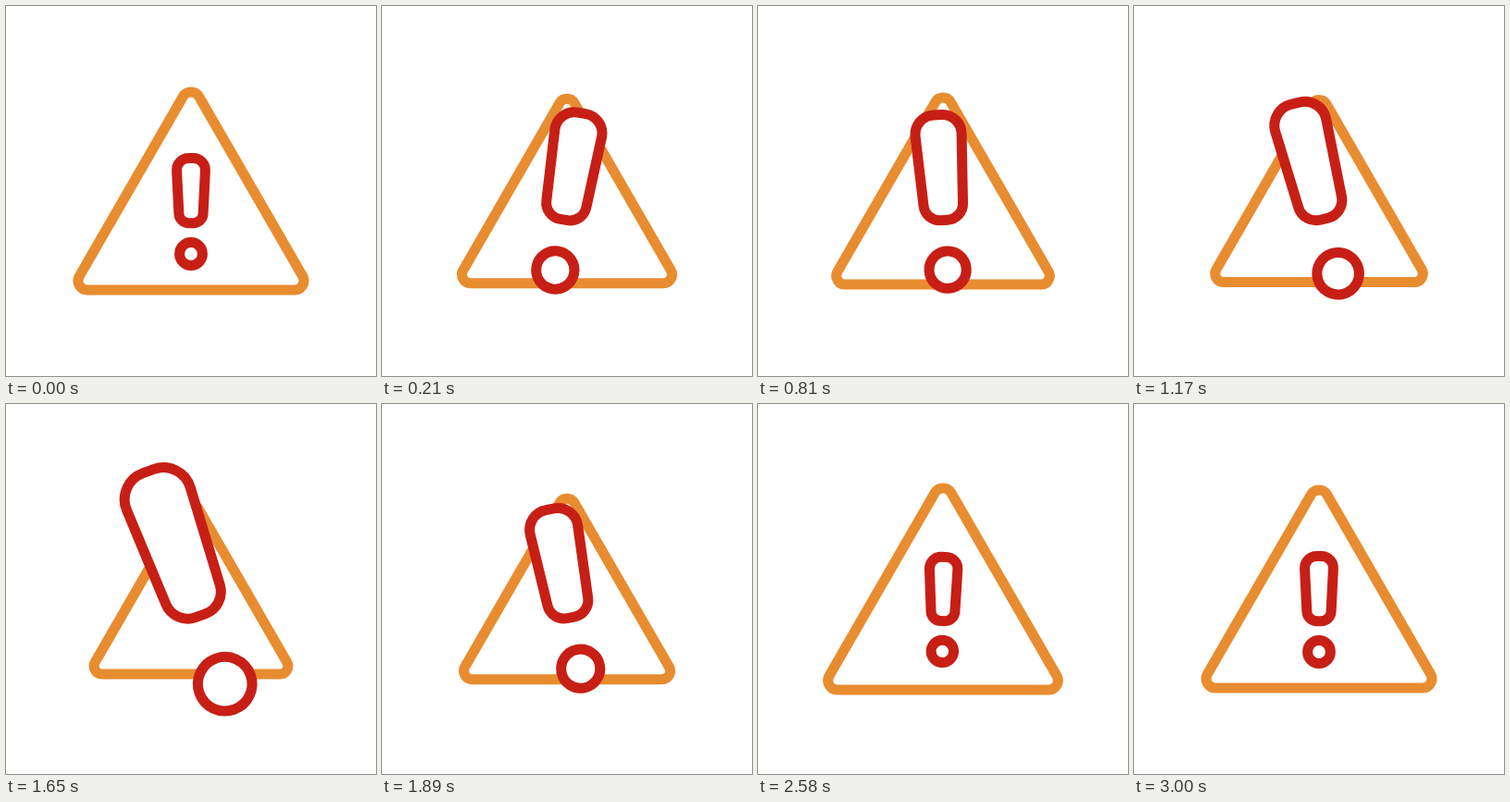
An HTML page for the animation above (3.03 s loop, 400 px wide and 400 px high).

```html
<!DOCTYPE html>
<html lang="en">
<head>
<meta charset="utf-8">
<title>Warning sign</title>
<style>
  html, body { margin: 0; width: 100%; height: 100%; overflow: hidden; background: #fff; }
  svg { display: block; width: 100%; height: 100%; }
  path, circle { fill: #fff; }
  #sign { stroke: #e88c30; }
  #bang { stroke: #c71f16; }
</style>
</head>
<body>
<svg viewBox="0 0 400 400">
  <g id="sign"><path id="triangle"/></g>
  <g id="bang">
    <path id="bar"/>
    <circle cy="46" r="12.4"/>
  </g>
</svg>
<script>
const LOOP = 3030;
const STROKE = 11;
const sign = document.getElementById('sign');
const bang = document.getElementById('bang');

// The mark swings forward to the right, then to the left, and settles.
const POSES = [
  { time: 0, sign: 1, bang: 1, tilt: 0 },
  { time: 435, sign: .856, bang: 2.39, tilt: 20 },
  { time: 880, sign: .951, bang: 1.57, tilt: -7 },
  { time: 1635, sign: .859, bang: 2.37, tilt: -19.8 },
  { time: 1890, sign: .914, bang: 1.7, tilt: -10.9 },
  { time: 2220, sign: 1.124, bang: .91, tilt: 5.5 },
  { time: 2700, sign: 1, bang: 1, tilt: 0 }
];

// Closed clockwise polygon; each corner is [x, y, radius].
function roundedPolygon(corners) {
  const n = corners.length;
  const parts = corners.map(([x, y, r], i) => {
    const [px, py] = corners[(i + n - 1) % n];
    const [nx, ny] = corners[(i + 1) % n];
    const before = Math.atan2(py - y, px - x);
    const after = Math.atan2(ny - y, nx - x);
    const angle = Math.acos(Math.cos(before - after));
    const cut = r / Math.tan(angle / 2);
    const at = a => `${x + cut * Math.cos(a)} ${y + cut * Math.sin(a)}`;
    return `${at(before)} A${r} ${r} 0 0 1 ${at(after)}`;
  });
  return 'M' + parts.join(' L') + ' Z';
}

// Smooth curve of one property through the poses, flat at every turning point.
function track(name) {
  const slopes = POSES.slice(1).map((pose, i) =>
    (pose[name] - POSES[i][name]) / (pose.time - POSES[i].time));
  const tangents = POSES.map((_, i) => {
    const a = slopes[i - 1], b = slopes[i];
    return a * b > 0 ? 2 * a * b / (a + b) : 0;
  });
  return time => {
    const next = POSES.findIndex(pose => pose.time > time);
    if (next < 0) return POSES[POSES.length - 1][name];
    const from = POSES[next - 1], to = POSES[next];
    const span = to.time - from.time, u = (time - from.time) / span, w = 1 - u;
    return from[name] * w * w * (1 + 2 * u) + to[name] * u * u * (1 + 2 * w)
      + span * u * w * (w * tangents[next - 1] - u * tangents[next]);
  };
}

const signScale = track('sign');
const bangScale = track('bang');
const bangTilt = track('tilt');

// The outline keeps its width whatever the scale.
function place(group, y, scale, tilt) {
  group.setAttribute('transform', `translate(200 ${y}) rotate(${tilt}) scale(${scale})`);
  group.setAttribute('stroke-width', STROKE / scale);
}

function draw(time) {
  const scale = bangScale(time);
  const growth = Math.max(0, scale - 1);
  place(sign, 200, signScale(time), 0);
  place(bang, 222 - 20 * growth + 3 * growth * growth, scale, bangTilt(time));
}

document.getElementById('triangle').setAttribute('d',
  roundedPolygon([[0, -117, 10], [129.3, 107, 10], [-129.3, 107, 10]]));
document.getElementById('bar').setAttribute('d',
  roundedPolygon([[-16.1, -57.4, 12.8], [16.1, -57.4, 12.8], [12.6, 12.8, 10.8], [-12.6, 12.8, 10.8]]));

const start = performance.now();
function frame() {
  draw((performance.now() - start) % LOOP);
  requestAnimationFrame(frame);
}
frame();
</script>
</body>
</html>
```
